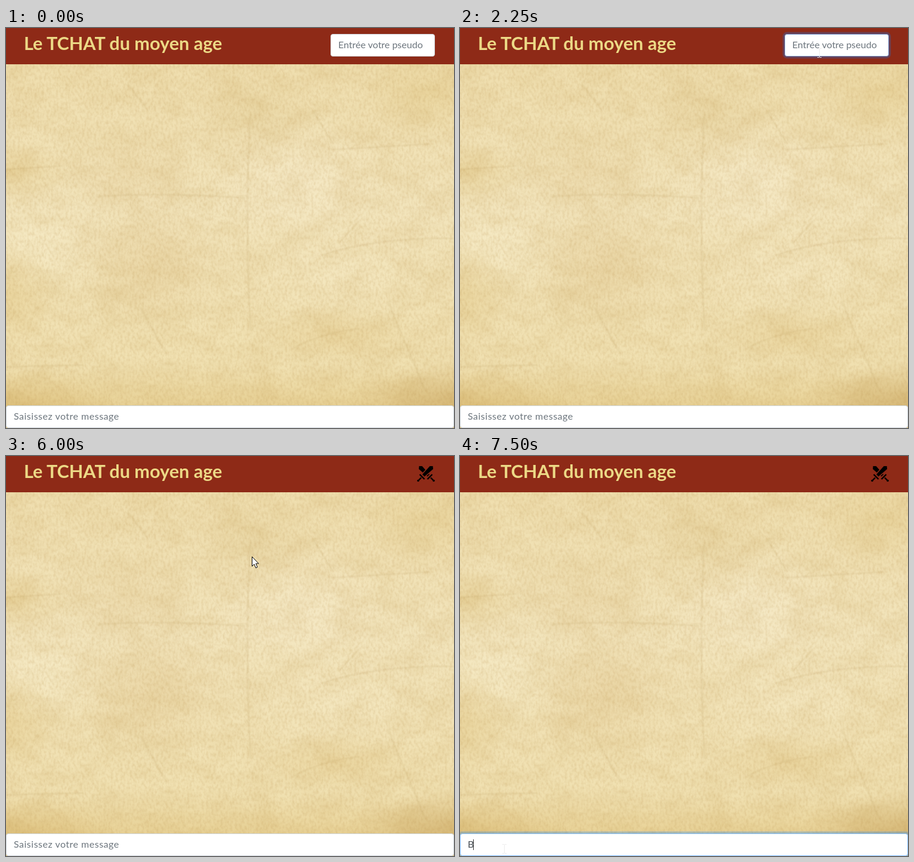
Recreate the animation shown at these times as an HTML page. Size 751x673 px, loop 8000 ms.

```html
<!DOCTYPE html>
<html lang="fr">
<head>
<meta charset="utf-8">
<title>Le TCHAT du moyen age</title>
<style>
  html, body { margin: 0; width: 100%; height: 100%; overflow: hidden; }
  #stage {
    position: relative; width: 751px; height: 673px; overflow: hidden;
    font: 16px Lato, sans-serif;
    background:
      radial-gradient(190px 70px at 0 640px, #c99f4a55, transparent),
      radial-gradient(180px 70px at 751px 630px, #bd944a66, transparent),
      radial-gradient(130px 50px at 560px 515px, #cfa75233, transparent),
      radial-gradient(120px 90px at 420px 150px, #c6a45a22, transparent),
      radial-gradient(130px 110px at 240px 400px, #cfa86433, transparent),
      radial-gradient(110px 80px at 210px 245px, #cfa86422, transparent),
      radial-gradient(110px 50px at 0 240px, #d5b25d44, transparent),
      radial-gradient(90px 90px at 0 450px, #d2ad5844, transparent),
      radial-gradient(120px 80px at 710px 110px, #d5b25d33, transparent),
      radial-gradient(150px 110px at 490px 250px, #fbf2d866, transparent),
      radial-gradient(140px 80px at 60px 370px, #fbf3d466, transparent),
      radial-gradient(150px 90px at 560px 420px, #fbf2d444, transparent),
      linear-gradient(#efdeae 60px, #f2e4bb 45%, #f0e0b0 85%, #e8d297 635px);
  }
  #paper, #cursors { position: absolute; left: 0; top: 0; }
  header { position: absolute; left: 0; top: 0; width: 751px; height: 61px; background: #8e2a17; }
  h1 { position: absolute; left: 30px; top: 0; margin: 0; font: bold 30.6px/52px Lato, sans-serif; color: #ecd986; white-space: nowrap; }
  .field {
    position: absolute; box-sizing: border-box; height: 38px; padding-left: 12px;
    border: 1px solid #ced4da; border-radius: 4px; background: #fff;
    color: #495057; line-height: 34px; white-space: pre;
  }
  #pseudo { left: 544px; top: 10px; width: 175px; }
  #message { left: 0; top: 635px; width: 751px; }
  .hint { color: #6c757d; }
  #message .hint { letter-spacing: .5px; }
  .caret { display: inline-block; width: 1px; height: 18px; margin: 0 -1px 0 0; vertical-align: -4px; background: #333; }
  #message .caret { margin: 0 0 0 -1px; }
  #swords { position: absolute; left: 689px; top: 16px; }
</style>
</head>
<body>
<div id="stage">
  <svg id="paper" width="751" height="673">
    <defs>
      <filter id="blotch" x="0" y="0" width="1" height="1" color-interpolation-filters="sRGB">
        <feTurbulence type="fractalNoise" baseFrequency=".02 .03" numOctaves="4" seed="7"/>
        <feColorMatrix values="0 0 0 0 .74  0 0 0 0 .58  0 0 0 0 .27  .28 0 0 0 -.1"/>
      </filter>
      <filter id="grain" x="0" y="0" width="1" height="1" color-interpolation-filters="sRGB">
        <feTurbulence type="fractalNoise" baseFrequency=".25 .16" numOctaves="2" seed="3"/>
        <feColorMatrix values="0 0 0 0 .72  0 0 0 0 .56  0 0 0 0 .3  .4 0 0 0 -.15"/>
      </filter>
      <filter id="soft"><feGaussianBlur stdDeviation="1"/></filter>
    </defs>
    <rect width="751" height="673" filter="url(#blotch)"/>
    <rect width="751" height="673" filter="url(#grain)"/>
    <g fill="none" stroke="#a98445" stroke-opacity=".16" stroke-width="2" filter="url(#soft)">
      <path d="M155 283Q280 277 400 286M225 470L270 550M409 150Q400 330 410 510M515 140L548 195M480 540Q530 512 592 506"/>
      <path d="M558 362L592 325M530 382Q620 352 751 354M640 460L704 612M0 238L95 232M0 570L130 567M545 205L710 195M205 95L238 140"/>
    </g>
  </svg>
  <header><h1>Le TCHAT du moyen age</h1></header>
  <div class="field" id="pseudo"><span class="value"></span><i class="caret"></i><span class="hint">Entrée votre pseudo</span></div>
  <svg id="swords" width="30" height="28">
    <defs>
      <path id="blade" d="M26.5 1L27 6L12.5 18.5L9 15L21.5 1Z"/>
      <g id="sword">
        <use href="#blade"/>
        <path d="M4.5 15L12.5 23M7 20.5L3 24.5" fill="none" stroke="#000" stroke-width="2.4"/>
        <circle cx="2" cy="25.5" r="1.8"/>
      </g>
    </defs>
    <use href="#sword" transform="matrix(-1 0 0 1 30 0)"/>
    <use href="#blade" fill="none" stroke="#8e2a17" stroke-width="3"/>
    <use href="#sword"/>
  </svg>
  <div class="field" id="message"><span class="value"></span><i class="caret"></i><span class="hint">Saisissez votre message</span></div>
  <svg id="cursors" width="751" height="673">
    <path id="arrow" d="M.5 .5V16.5L4 13L6.8 19.3L9.5 18L6.8 12H11.5Z" fill="#fff" stroke="#000"/>
    <path id="beam" d="M-3.5 -7.5H-1L0 -7L1 -7.5H3.5M0 -7V7M-3.5 7.5H-1L0 7L1 7.5H3.5" fill="none" stroke="#ececec"/>
  </svg>
</div>
<script>
  const LOOP = 8000;
  const $ = selector => document.querySelector(selector);

  // Each track lists [start in ms, value]; a value holds until the next start.
  const at = (track, t) => track.reduce((held, [start, value]) => t >= start ? value : held, null);

  const pointer = [
    [750, ['arrow', 467, 520]], [1000, ['arrow', 581, 85]],
    [1250, ['beam', 602.5, 48]], [1500, ['beam', 602.5, 42]],
    [6000, ['arrow', 412, 169]], [6250, ['beam', 75.5, 652]], [6500, ['beam', 74.5, 661]]
  ];

  const fields = [
    {
      el: $('#pseudo'), text: 'Corvain', border: [111, 143, 200],
      typed: [[2750, 1], [3000, 2], [3250, 4], [3500, 5], [3750, 6], [4000, 7]],
      caret: [[1750, 1], [2250, 0], [2750, 1], [4500, 0], [5000, 1]],
      glow: [[1750, .35], [2000, 1]]
    },
    {
      el: $('#message'), text: 'B', border: [128, 189, 255],
      typed: [[7500, 1]],
      caret: [[6500, 1], [7250, 0], [7500, 1]],
      glow: [[6500, .1], [6750, 1]]
    }
  ];

  const show = (el, on) => { el.style.visibility = on ? 'visible' : 'hidden'; };

  function drawField({ el, text, border, typed, caret, glow }, t) {
    const count = at(typed, t) || 0;
    const focus = at(glow, t) || 0;
    const idle = [206, 212, 218];
    el.querySelector('.value').textContent = text.slice(0, count);
    el.querySelector('.hint').style.display = count ? 'none' : '';
    el.querySelector('.caret').style.opacity = at(caret, t) || 0;
    el.style.borderColor = `rgb(${idle.map((c, i) => c + (border[i] - c) * focus)})`;
    el.style.boxShadow = focus ? `0 0 0 ${3.2 * focus}px rgba(0,123,255,${.25 * focus})` : 'none';
  }

  function draw() {
    const t = performance.now() % LOOP;
    const joined = t >= 5250;
    fields.forEach(field => drawField(field, t));
    $('#pseudo').style.display = joined ? 'none' : '';
    show($('#swords'), joined);

    const [kind, x, y] = at(pointer, t) || [];
    for (const id of ['arrow', 'beam']) {
      const el = $('#' + id);
      show(el, id === kind);
      if (id === kind) el.setAttribute('transform', `translate(${x} ${y})`);
    }
    requestAnimationFrame(draw);
  }
  draw();
</script>
</body>
</html>
```
